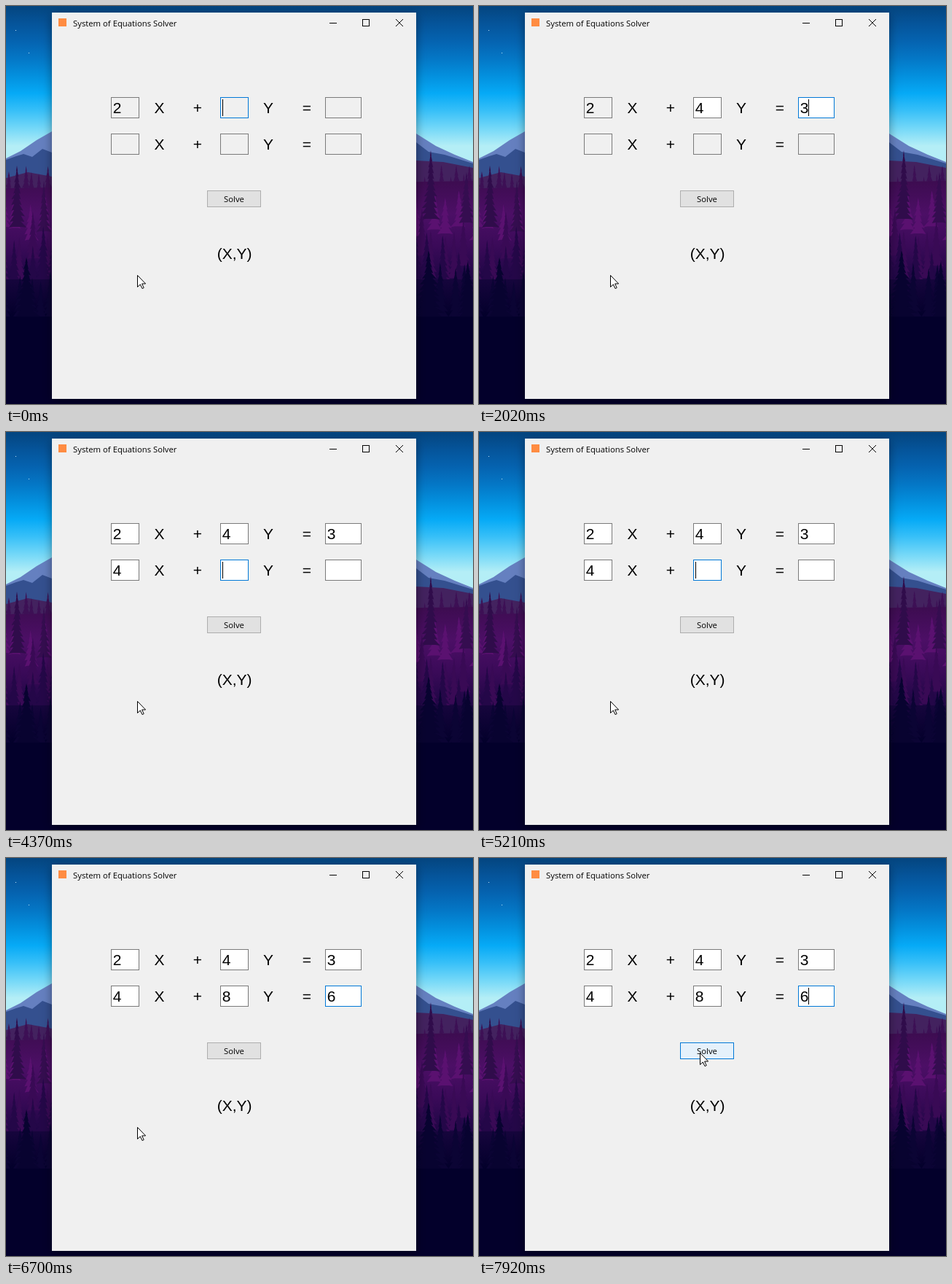
Animation, 641 px wide and 546 px high, one loop 8000 ms. Source, as an HTML page with a canvas:

```html
<!DOCTYPE html>
<html lang="en">
<head>
<meta charset="utf-8">
<title>System of Equations Solver</title>
<style>
  html, body { margin: 0; width: 641px; height: 546px; overflow: hidden; background: #03002b; }
  canvas, svg { position: absolute; left: 0; top: 0; display: block; }
  .big { font: 21px "Liberation Sans", Arial, sans-serif; font-kerning: none; text-anchor: middle; }
  .ui { font: 11.3px "Open Sans", sans-serif; }
  .line { fill: none; stroke: #000; }
</style>
</head>
<body>
<canvas id="scene" width="641" height="546"></canvas>
<svg id="app" width="641" height="546" viewBox="0 0 641 546">
  <rect x="63" y="9" width="500" height="530" fill="#f0f0f0"/>
  <rect x="72" y="17" width="11" height="11" fill="#ff8c42"/>
  <text class="ui" x="92" y="28">System of Equations Solver</text>
  <path class="line" d="M444 23.5H454M489.5 18.5H498.5V27.5H489.5Z" shape-rendering="crispEdges"/>
  <path class="line" d="M535 18L545 28M545 18L535 28"/>
  <g id="rows"></g>
  <rect id="button" x="276.5" y="253.5" width="73" height="22"/>
  <text class="ui" x="313" y="269" text-anchor="middle">Solve</text>
  <text class="big" x="313.7" y="347">(X,Y)</text>
  <rect id="caret" width="1" height="23"/>
  <path id="pointer" d="M.5 .5V16.5L4.3 13L7 18.6L9.2 17.6L6.6 12H11.6Z" fill="#fff" stroke="#000"/>
</svg>
<script>
const $ = id => document.getElementById(id);

// Wallpaper
const ctx = $('scene').getContext('2d');
let seed = 7;
const rand = () => (seed = seed * 16807 % 2147483647) / 2147483647;

function gradient(y0, y1, ...colors) {
  const g = ctx.createLinearGradient(0, y0, 0, y1);
  colors.forEach((c, i) => g.addColorStop(i / (colors.length - 1), c));
  return g;
}

function ridge(fill, ...pts) {
  ctx.fillStyle = fill;
  ctx.beginPath();
  ctx.moveTo(0, 546);
  pts.forEach(p => ctx.lineTo(...p));
  ctx.lineTo(641, 546);
  ctx.fill();
}

function tree(x, top, height, half, fill) {
  const tiers = Math.max(4, Math.round(height / 8));
  const edge = side => Array.from({ length: tiers }, (_, i) => {
    const y = top + height * (i + 1) / tiers;
    const w = half * (i + 1) / tiers * (0.75 + rand() * 0.4);
    return [[x + side * w, y], [x + side * w * 0.5, y - 1]];
  }).flat();
  ctx.fillStyle = fill;
  ctx.beginPath();
  ctx.moveTo(x, top);
  edge(1).forEach(p => ctx.lineTo(...p));
  edge(-1).reverse().forEach(p => ctx.lineTo(...p));
  ctx.fill();
}

function forest(top, spread, height, half, gap, fill) {
  for (let x = -4; x < 650; x += gap * (0.6 + rand() * 0.8)) {
    tree(x, top + rand() * spread, height, half, fill);
  }
}

function paintScene() {
  ctx.fillStyle = gradient(0, 192, '#04457f', '#05549a', '#0563b0', '#0477c6', '#0390de', '#06aaf6', '#38c0f8', '#74d8f8', '#b4eef6');
  ctx.fillRect(0, 0, 641, 546);
  ctx.fillStyle = '#bfe6f5';
  [[31, 64], [13, 33]].forEach(([x, y]) => ctx.fillRect(x, y, 1, 1));

  ridge('#6580c0', [0, 209], [20, 199], [42, 184], [63, 172], [563, 175], [590, 192], [616, 204], [641, 214]);
  ridge('#34508f', [0, 211], [14, 206], [24, 203], [36, 207], [50, 196], [63, 201], [563, 187], [580, 200], [602, 204], [641, 216]);
  ridge('#43225f', [0, 236], [30, 228], [63, 234], [563, 212], [600, 214], [641, 222]);
  forest(218, 24, 45, 8, 10, '#3d1055');
  ridge(gradient(240, 420, '#3d0c50', '#4c0f66', '#3a0a58', '#1d0644', '#07022f'), [0, 250], [641, 240]);
  forest(242, 34, 50, 10, 20, '#5a1170');
  tree(15, 219, 85, 13, '#300c4b');
  tree(583, 198, 95, 13, '#300c4b');
  tree(52, 240, 70, 10, '#350d50');
  tree(632, 228, 70, 11, '#350d50');
  forest(268, 50, 65, 10, 17, '#390a55');
  forest(300, 50, 75, 12, 20, '#240748');
  ridge(gradient(365, 425, '#1a0640', '#03002b'), [0, 375], [641, 375]);
  forest(350, 40, 75, 13, 17, '#0b0434');
  tree(28, 345, 90, 20, '#080330');
  tree(580, 335, 110, 27, '#080330');
  tree(634, 350, 95, 20, '#080330');
  ridge('#03002b', [0, 426], [641, 426]);

  ctx.shadowColor = 'rgba(0,0,0,.4)';
  ctx.shadowBlur = 13;
  ctx.shadowOffsetY = 3;
  ctx.fillRect(63, 9, 500, 530);
}
paintScene();

// Form
function add(name, attrs, text = '') {
  const el = document.createElementNS('http://www.w3.org/2000/svg', name);
  set(el, attrs);
  el.textContent = text;
  return $('rows').appendChild(el);
}
function set(el, attrs) {
  for (const k in attrs) el.setAttribute(k, attrs[k]);
}

const columns = [[144, 39], [294, 39], [438, 50]];
const fields = [];
for (const y of [125, 175]) {
  for (const [x, w] of columns) {
    fields.push({
      x, y,
      box: add('rect', { x: x + .5, y: y + .5, width: w - 1, height: 28 }),
      text: add('text', { class: 'big', x: x + 8.5, y: y + 22 })
    });
  }
  [['X', 210.5], ['+', 263], ['Y', 360], ['=', 413]].forEach(([s, x]) =>
    add('text', { class: 'big', x, y: y + 22 }, s));
}

// Each step: time and what changes. lit = index range of white fields.
const on = { caret: true }, off = { caret: false };
const type = values => ({ values, caret: true });
const tab = focus => ({ focus, caret: true });
const steps = [
  [0, { ...type('2'), focus: 1, lit: [0, 0], at: [180, 369], hot: false }],
  [680, off], [960, on], [1080, type('24')],
  [1600, { ...tab(2), lit: [1, 3] }], [2020, type('243')], [2160, off], [2570, on],
  [2720, { ...tab(3), lit: [0, 6] }], [3270, off], [3680, on], [3810, type('2434')], [4210, off],
  [4370, tab(4)], [4920, off], [5210, on], [5610, off], [5730, type('24348')],
  [5980, tab(5)], [6700, { values: '243486', caret: false }], [6960, on],
  [7520, { caret: false, at: [232, 345] }], [7650, { at: [280, 302] }],
  [7800, { at: [302, 272], hot: true }], [7920, { caret: true, at: [303, 267] }]
];

function render(s) {
  fields.forEach((f, i) => {
    const white = i >= s.lit[0] && i < s.lit[1];
    set(f.box, {
      fill: white ? '#fff' : '#f0f0f0',
      stroke: s.focus === i ? '#0078d7' : '#7a7a7a'
    });
    f.text.textContent = s.values[i] || '';
  });
  const f = fields[s.focus];
  set($('caret'), {
    x: f.x + (s.values[s.focus] ? 14 : 3), y: f.y + 3,
    visibility: s.caret ? 'visible' : 'hidden'
  });
  set($('button'), { fill: s.hot ? '#e5f1fb' : '#e1e1e1', stroke: s.hot ? '#0078d7' : '#adadad' });
  set($('pointer'), { transform: `translate(${s.at})` });
}

const start = performance.now();
let shown = -1;
function tick() {
  const t = (performance.now() - start) % 8000;
  const count = steps.filter(([time]) => time <= t).length;
  if (count !== shown) {
    shown = count;
    render(Object.assign({}, ...steps.slice(0, count).map(step => step[1])));
  }
  requestAnimationFrame(tick);
}
tick();
</script>
</body>
</html>
```
